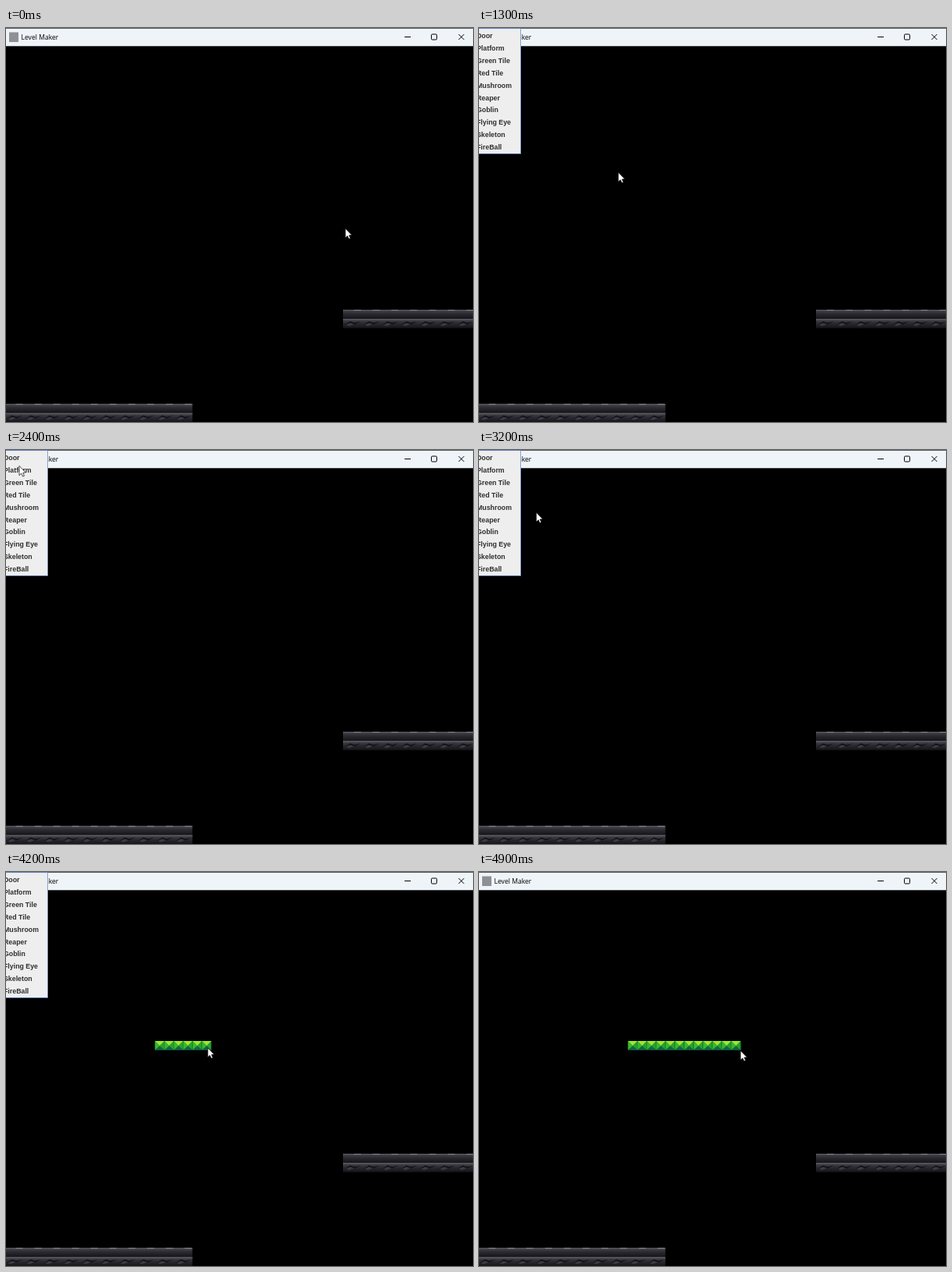
An HTML page with a canvas for the animation above (5000 ms loop, 600x506 px).

```html
<!DOCTYPE html>
<html lang="en">
<head>
<meta charset="utf-8">
<title>Level Maker</title>
<style>
html, body { margin: 0; height: 100%; overflow: hidden; background: #000; }
canvas { display: block; }
</style>
</head>
<body>
<canvas id="stage" width="600" height="506"></canvas>
<script>
const ctx = document.getElementById('stage').getContext('2d');
const LOOP = 5000, STEP = 100;
const TILE = 12.06, ROW_X = 191.5, ROW_Y = 217;
const MENU_ON = 1000, MENU_OFF = 4700, PRESS = 3500;
const ITEMS = ['Door', 'Platform', 'Green Tile', 'Red Tile', 'Mushroom',
  'Reaper', 'Goblin', 'Flying Eye', 'Skeleton', 'FireBall'];

// Pointer stops: time, x, y
const PATH = [
  [0, 436, 257], [800, 436, 257], [900, 420, 243], [1200, 328, 222],
  [1300, 179, 185], [1500, 30, 62], [1800, 17, 20], [2400, 17, 20],
  [2800, 46, 45], [3100, 40, 44], [3600, 208, 223], [4000, 208, 223],
  [4500, 336, 229], [LOOP, 336, 229]
];

function pointerAt(t) {
  const i = PATH.findIndex(p => p[0] > t);
  const [t0, x0, y0] = PATH[i - 1], [t1, x1, y1] = PATH[i];
  const k = (t - t0) / (t1 - t0);
  return [x0 + (x1 - x0) * k, y0 + (y1 - y0) * k];
}

function rect(color, x, y, w, h) {
  ctx.fillStyle = color;
  ctx.fillRect(x, y, w, h);
}

function poly(color, ...pts) {
  ctx.fillStyle = color;
  ctx.beginPath();
  for (let i = 0; i < pts.length; i += 2) ctx.lineTo(pts[i], pts[i + 1]);
  ctx.closePath();
  ctx.fill();
}

function text(str, x, y, font, color) {
  ctx.font = font;
  ctx.fillStyle = color;
  ctx.fillText(str, x, y);
}

// Two ledges of fading grey, the lower one set with stones
function platform(x, y, w) {
  ctx.save();
  ctx.beginPath();
  ctx.rect(x, y, w, 24);
  ctx.clip();
  ctx.translate(x, y);
  for (const top of [0, 12]) {
    const shade = ctx.createLinearGradient(0, top, 0, top + 12);
    shade.addColorStop(0, '#4a4950');
    shade.addColorStop(.45, '#2b2a30');
    shade.addColorStop(1, '#141318');
    rect(shade, 0, top, w, 12);
    rect('#605f67', 0, top, w, 1.3);
  }
  for (let i = 0; i < w; i += TILE * 2) {
    rect('#8b8a90', i + 14, 0, 9, 1.2);
    poly('#111016', i + 2, 20, i + 9, 15, i + 15, 17, i + 23, 15, i + 15, 19, i + 9, 17);
    poly('#3c3b44', i + 4, 20, i + 9, 17, i + 14, 18.5, i + 8, 21);
  }
  ctx.restore();
}

function greenTile(x, y) {
  const w = TILE, h = 11.8, cx = x + w / 2, cy = y + 6.2;
  rect('#168a2a', x, y, w, h);
  poly('#a3e52f', x, y, x + w, y, cx, cy);
  poly('#36b82f', x, y, cx, cy, x, y + h);
  poly('#27a32e', x + w, y, cx, cy, x + w, y + h);
  poly('#146640', x, y + h, cx, cy, x + w, y + h);
  rect('#0d5a2a', x + w - .6, y + 1, .8, h - 1);
  rect('#154f48', x, y + h - 1, w, 1);
}

function titleBar() {
  rect('#eff4f9', 0, 0, 600, 23.3);
  rect('#33383d', 0, 0, 600, .8);
  rect('#8f9095', 4, 5.5, 12, 12.5);
  text('Level Maker', 19.5, 15, '8.6px "Open Sans", "Noto Sans", sans-serif', '#000');
  ctx.strokeStyle = '#000';
  ctx.lineWidth = 1;
  ctx.beginPath();
  ctx.moveTo(512, 11.5); ctx.lineTo(520, 11.5);
  ctx.roundRect(546.5, 8, 7, 7, 1.2);
  ctx.moveTo(581.5, 8); ctx.lineTo(588.5, 15);
  ctx.moveTo(588.5, 8); ctx.lineTo(581.5, 15);
  ctx.stroke();
}

function menu() {
  rect('#6382bf', 0, 0, 54, 162);
  rect('#eeeeee', 0, 1, 53.3, 160);
  ITEMS.forEach((s, i) => text(s, -3, 13.3 + i * 15.85,
    'bold 8.8px "Liberation Sans", Arial, sans-serif', '#303030'));
}

function pointer(x, y) {
  ctx.save();
  ctx.translate(x - .4, y);
  poly('#fff', .4, .4, .4, 12.6, 3.1, 10, 5, 14, 6.9, 13.2, 5.2, 9.2, 8.8, 9);
  ctx.strokeStyle = '#000';
  ctx.lineWidth = .7;
  ctx.stroke();
  ctx.restore();
}

function draw(now) {
  const t = Math.floor(now % LOOP / STEP) * STEP;
  const [x, y] = pointerAt(t);
  rect('#000', 0, 0, 600, 506);
  platform(433, 361.7, 167);
  platform(-1.5, 482.6, TILE * 20);
  if (t >= PRESS) {
    const count = Math.ceil((x - ROW_X) / TILE);
    for (let i = 0; i < count; i++) greenTile(ROW_X + i * TILE, ROW_Y);
  }
  titleBar();
  if (t >= MENU_ON && t < MENU_OFF) menu();
  pointer(x, y);
}

const start = performance.now();
function frame() {
  draw(performance.now() - start);
  requestAnimationFrame(frame);
}
frame();
</script>
</body>
</html>
```
